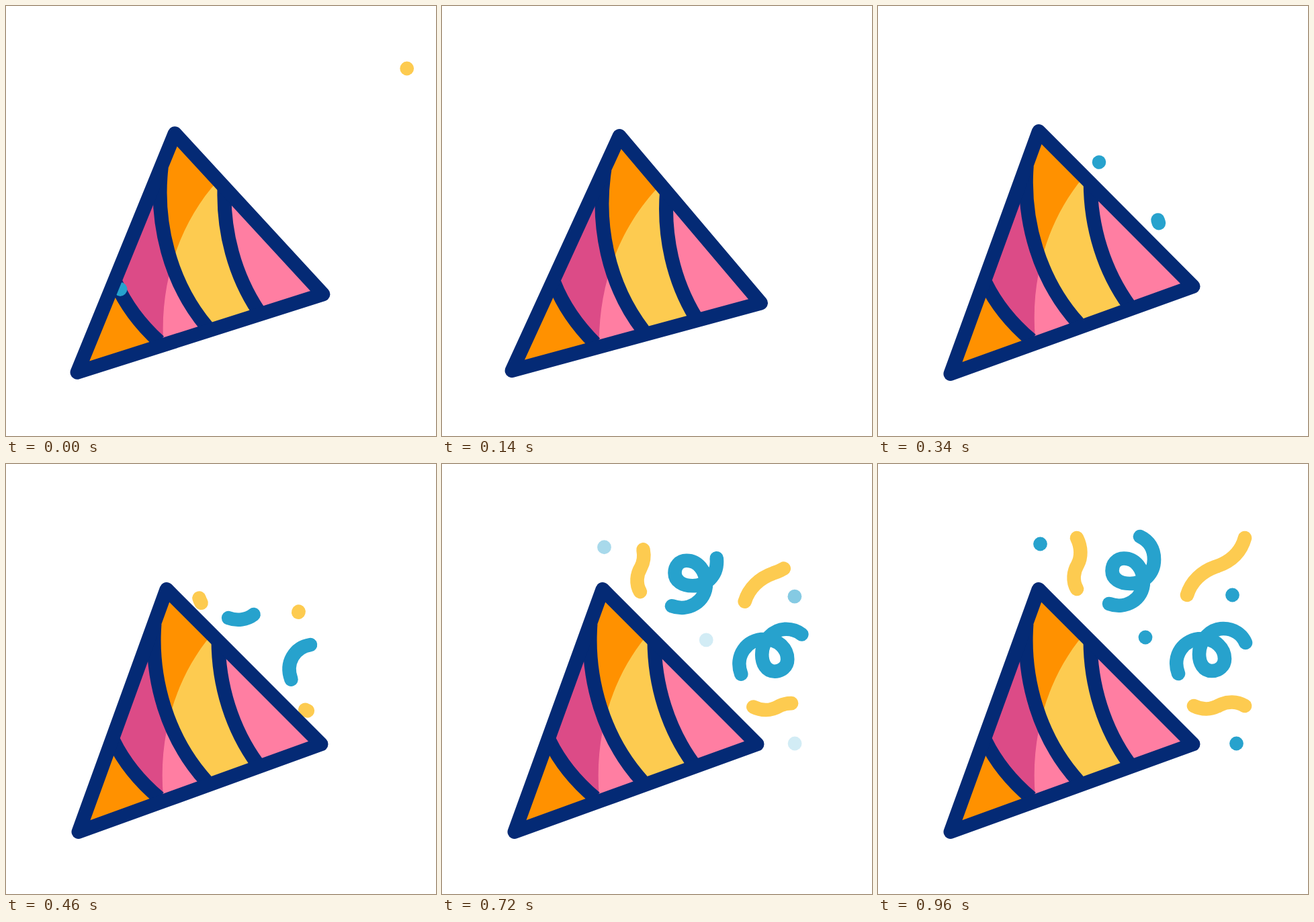
An HTML page that plays this animation: 640x640 px, repeating every 980 ms.

```html
<!DOCTYPE html>
<html lang="en">
<head>
<meta charset="utf-8">
<title>Party popper</title>
<style>
  html, body { margin: 0; width: 100%; height: 100%; overflow: hidden; background: #fff; }
  svg { display: block; width: 100%; height: 100%; }
  .line { fill: none; stroke: #042a75; stroke-width: 21; stroke-linejoin: round; }
  .streamer { fill: none; stroke-width: 20.6; stroke-linecap: round; }
</style>
</head>
<body>
<svg viewBox="0 0 640 640">
  <defs>
    <clipPath id="shade">
      <path d="M108,548 L234,495 C226,400 255,315 305,255 L239,186Z"/>
    </clipPath>
    <path id="band" d="M221,238 C215,320 240,408 298,472 L374,446 C337,395 316,330 316,262 L239,186Z"/>
    <path id="body" d="M239,186.5 L469,417 L108,547.5Z"/>
  </defs>
  <g class="cone">
    <use href="#body" fill="#ff7ea2"/>
    <use href="#body" fill="#dc4b87" clip-path="url(#shade)"/>
    <use href="#band" fill="#fdcb50"/>
    <use href="#band" fill="#ff9100" clip-path="url(#shade)"/>
    <path fill="#ff9100" d="M160,412 Q183,459 228,497 L108,548Z"/>
    <path class="line" d="M160,412 Q183,459 228,497 M221,238 C215,320 240,408 298,472 M316,262 C316,330 337,395 374,446"/>
  </g>
  <g id="confetti"></g>
  <g class="cone"><use href="#body" class="line"/></g>
</svg>
<script>
const LOOP = 980;
const BLUE = '#27a2cd', YELLOW = '#fdcb50';
const confetti = document.getElementById('confetti');
const cones = document.querySelectorAll('.cone');

// Sine ease from 0 to 1, clamped at both ends.
const ease = (t, start, length) => {
  const p = Math.min(1, Math.max(0, (t - start) / length));
  return (1 - Math.cos(Math.PI * p)) / 2;
};

const add = (tag, attrs) => {
  const el = document.createElementNS('http://www.w3.org/2000/svg', tag);
  for (const key in attrs) el.setAttribute(key, attrs[key]);
  return confetti.appendChild(el);
};

const addDot = (cx, cy, fill) => add('circle', { cx, cy, r: 10.4, fill });

// colour, start time, initial offset, path
const streamers = [
  [BLUE, 300, -29.5, 11.3, 'M447,312 C437,285 455,260 482,260 C503,260 516,275 516,290 C516,301 507,308 497,308 C484,308 478,296 478,283 C478,262 495,245 514,245 C530,245 542,254 547,266'],
  [BLUE, 340, -15, 24.5, 'M344,208 C368,217 395,202 395,175 C395,156 383,140.5 366,140.5 C355,140.5 348.5,149 348.5,159 C348.5,171 360,178 375,178 C396,178 411,163 411,142 C411,126 403,114 390,108'],
  [YELLOW, 360, -6, 23, 'M296,186 C289,174 291,160 297,150 C303,139 303,124 296,110'],
  [YELLOW, 390, -26, 6, 'M470,360 C482,366 496,366 508,359 C520,353 534,353 546,360'],
  [YELLOW, 430, -25, 26, 'M460,195 C466,175 482,160 502,153 C524,146 540,132 546,110']
].map(([stroke, start, dx, dy, d]) => {
  const el = add('path', { class: 'streamer', stroke, d });
  return { el, start, dx, dy, length: el.getTotalLength() };
});

// position, start time, initial offset
const dots = [
  [241.5, 119, 607, 0, 8],
  [527.5, 195, 580, -6, 5],
  [398, 258, 643, -6, 5],
  [533.5, 416, 643, -10.6, 0]
].map(([x, y, start, dx, dy]) => ({ el: addDot(x, y, BLUE), start, dx, dy }));

// Two specks that flash as the loop restarts.
const specks = [addDot(170, 421.5, BLUE), addDot(596.7, 93, YELLOW)];

const shift = ({ el, dx, dy }, left) =>
  el.setAttribute('transform', `translate(${dx * left} ${dy * left})`);

function draw(t) {
  const tilt = 4.75 * (t < 122 ? ease(t, -113, 235) : 1 - ease(t, 122, 235));
  for (const cone of cones) cone.setAttribute('transform', `rotate(${tilt} 165 497)`);

  for (const s of streamers) {
    const p = ease(t, s.start, 500);
    s.el.style.display = p > 0 ? '' : 'none';
    s.el.setAttribute('stroke-dasharray', p < 1 ? `${p * s.length} ${s.length * 2}` : 'none');
    shift(s, 1 - p);
  }

  for (const dot of dots) {
    const p = ease(t, dot.start, 260);
    dot.el.setAttribute('opacity', p);
    shift(dot, 1 - p);
  }

  for (const speck of specks) speck.style.display = t < 20 ? '' : 'none';
}

const origin = performance.now();
function tick() {
  draw((performance.now() - origin) % LOOP);
  requestAnimationFrame(tick);
}
draw(0);
requestAnimationFrame(tick);
</script>
</body>
</html>
```
